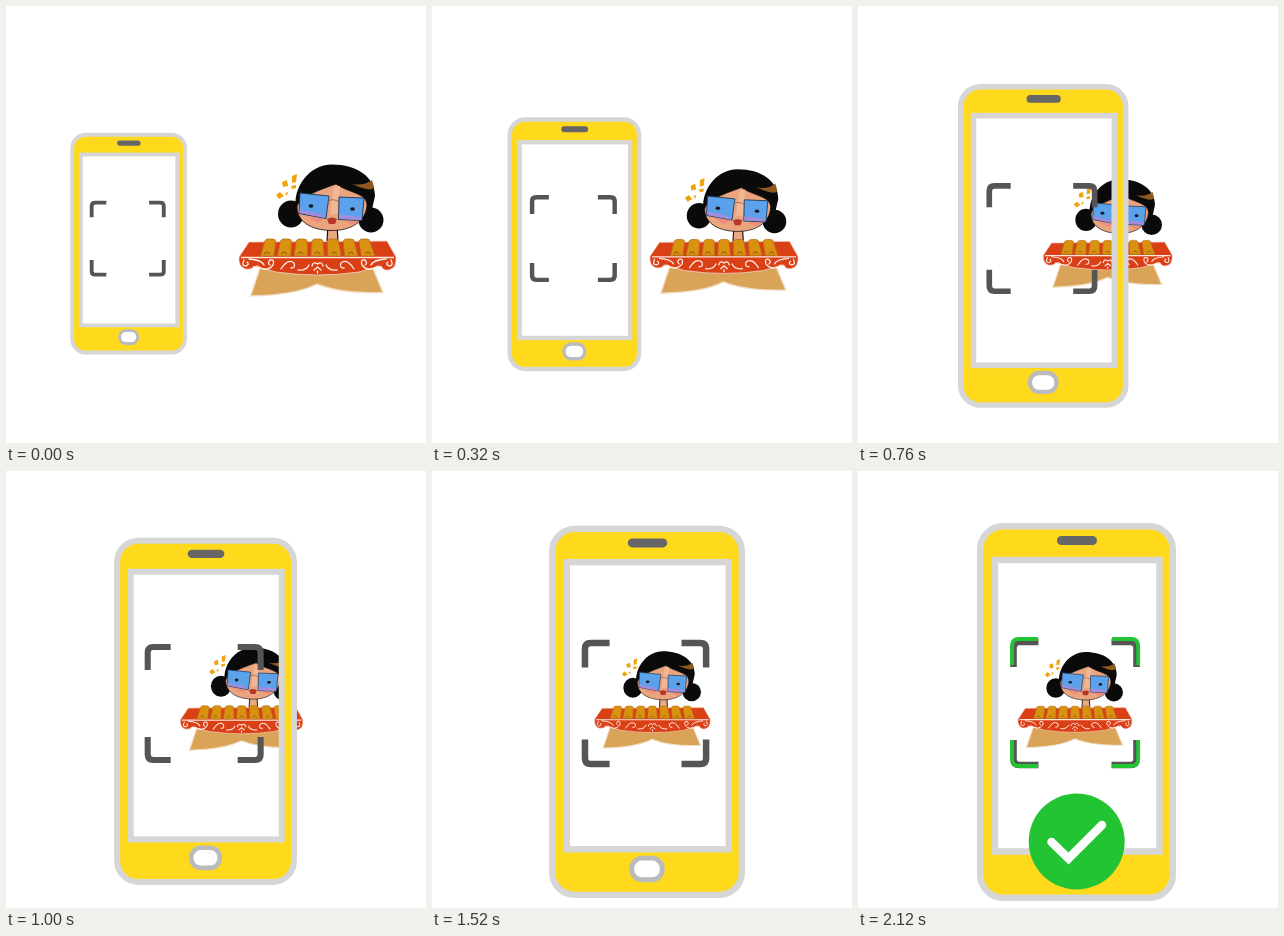
Write an HTML page that moves like this. It is 420x437 px and loops after 3.04 s.

```html
<!DOCTYPE html>
<html lang="en">
<head>
<meta charset="utf-8">
<title>Phone scan</title>
<style>
html, body { margin: 0; width: 100%; height: 100%; overflow: hidden; background: #fff; }
svg { display: block; width: 100vw; height: 100vh; }
</style>
</head>
<body>
<svg viewBox="0 0 420 437" fill="none">
  <g id="player">
    <path d="M254 262L244.500 290Q290 289 311 278Q335 288 377 286.500L366 260Z" fill="#d9a458" stroke="#f2dcc2" stroke-width="1.400"/>
    <path d="M322 218H331L332 236H321Z" fill="#e9a982" stroke="#111" stroke-width="1.200"/>
    <g fill="#0a0a0a">
      <ellipse cx="285" cy="208" rx="13" ry="13.500"/>
      <ellipse cx="365" cy="214" rx="12.500" ry="12.500"/>
      <path d="M290 204C286 182 303 158.500 326 158.500C351 158.500 369 171 369 190L364 212H291Z"/>
    </g>
    <path d="M291 202C291 193 307 186 330 178C343 187 361 187 361 199C360 216 344 225 325 224.500C305 224 292 216 291 202Z" fill="#eaa57e" stroke="#111" stroke-width=".8"/>
    <path d="M328 181L334 180L332 208L324 208Z" fill="#f2b795"/>
    <path d="M346 178Q358 180 366 174L368 181Q366 187 346 178Z" fill="#8e5920"/>
    <path d="M300 210L318 213L312 217ZM337 215H353L346 219Z" fill="#ef8c7d"/>
    <g fill="#5ba2ea" stroke="#1d3350" stroke-width=".9">
      <path d="M294 187L323 190L320 212.500L293 207.500Z"/>
      <path d="M333 191L358 192L356 214.500L332.500 213.500Z"/>
    </g>
    <path d="M293.500 203.500L315 208L319 212L293.500 207ZM333 208.500L355 211V214L333 213Z" fill="#a48bdc"/>
    <path d="M322 195Q327 192 333 196" stroke="#8d5a44" stroke-width=".8"/>
    <g fill="#171923"><ellipse cx="305" cy="200" rx="2.400" ry="1.800"/><ellipse cx="346.500" cy="203" rx="2.400" ry="1.800"/></g>
    <path d="M321 213Q326 210 331 213L329 218H323Z" fill="#b6382c"/>
    <g fill="#f0a30c">
      <path d="M276 176L281 174L282 180L277 181ZM286 170L291 168L290 176L286 177ZM270 189L274 186L278 190L273 193ZM285 180L290 179V182L286 183ZM279 187L282 186L281 190Z"/>
    </g>
    <path d="M243 236L381 235L390 251Q391 262 383 264Q377 265 375 260Q362 263 353 266Q312 272 270 266Q259 263 248 260Q246 264 239 263Q232 260 233 251Z" fill="#da3f16" stroke="#f6d5c8" stroke-width=".8"/>
    <path d="M235 251.500H388" stroke="#fbe6dc" stroke-width="1.500"/>
    <g id="bars"></g>
    <g id="swirls" stroke="#fff0e8" stroke-width="1.300" stroke-linecap="round">
      <path d="M306 260Q307 255 311.500 258Q316 255 317 260M308 264L311.500 261L315 264M311.500 265V267"/>
    </g>
  </g>
  <g id="phone">
    <path fill="#ffd91b" fill-rule="evenodd" d="M144 55H293Q315 55 315 77V405Q315 427 293 427H144Q122 427 122 405V77Q122 55 144 55ZM137 89V381H302V89Z"/>
    <g stroke="#d6d6d6" stroke-width="6.500">
      <rect x="122.200" y="55.200" width="192.600" height="371.600" rx="23"/>
      <rect x="137" y="89" width="164.500" height="291.500"/>
    </g>
    <rect x="199" y="65" width="40" height="9" rx="4.500" fill="#666"/>
    <rect x="203" y="389.500" width="31" height="22" rx="10.500" fill="#fff" stroke="#bbb" stroke-width="5"/>
    <path id="brackets" stroke="#555" stroke-width="6.600"/>
  </g>
  <g id="success">
    <path id="glow" stroke="#22c433" stroke-width="3.800"/>
    <circle cx="218.700" cy="370.500" r="48" fill="#22c433"/>
    <path d="M193.500 371L210.500 387.500L244 354" stroke="#fff" stroke-width="8.500" stroke-linecap="round"/>
  </g>
</svg>
<script>
const LOOP = 3040, STEP = 40, MOVE = 2000, FADE = 120;
const $ = id => document.getElementById(id);
const mix = (a, b, p) => a + (b - a) * p;

function corners(left, top, right, bottom, arm, r) {
  const corner = (x, y, sx, sy) =>
    `M${x + sx * arm} ${y}H${x + sx * r}Q${x} ${y} ${x} ${y + sy * r}V${y + sy * arm}`;
  return corner(left, top, 1, 1) + corner(right, top, -1, 1) +
    corner(left, bottom, 1, -1) + corner(right, bottom, -1, -1);
}

// cubic-bezier(.25, .1, .25, 1)
function ease(x) {
  if (x >= 1) return 1;
  let lo = 0, hi = 1;
  for (let i = 0; i < 30; i++) {
    const s = (lo + hi) / 2;
    if (0.75 * s * (1 - s) + s ** 3 < x) lo = s; else hi = s;
  }
  return 0.3 * lo * (1 - lo) ** 2 + 3 * lo * lo * (1 - lo) + lo ** 3;
}

// Moves and scales a group around its own centre.
function place(id, cx, cy, from, to, p) {
  const [x, y, s] = from.map((v, i) => mix(v, to[i], p));
  $(id).setAttribute("transform", `translate(${x} ${y}) scale(${s}) translate(${-cx} ${-cy})`);
}

function build() {
  $("brackets").setAttribute("d", corners(155.5, 171, 278.5, 294, 25, 6));
  $("glow").setAttribute("d", corners(154, 168, 280.2, 295, 26, 7));
  for (let i = 0; i < 7; i++) {
    const x = 254.5 + i * 16.8, lean = (3 - i) * 1.1;
    $("bars").innerHTML += `<path d="M${x} 250L${x + 1 + lean} 235Q${x + 2 + lean} 233 ${x + 4 + lean} 233H${x + 9 + lean}Q${x + 12 + lean} 233 ${x + 12 + lean} 236L${x + 13.5} 250Z"
      fill="#d8920f" stroke="#b8701a" stroke-width=".8"/><path d="M${x + 4} 248Q${x + 6.5} 244 ${x + 9} 248" stroke="#8f6018" stroke-width="1.2"/>`;
  }
  const scroll = "M18 260Q28 267 34 259Q36 253 31 254Q28 257 31 259M42 263Q49 252 55 257Q57 262 52 262" +
    "M5 254Q2 260 7 260Q11 258 8 256M10 253Q23 254 25 259M59 264Q67 265 70 259";
  for (const side of ["translate(233)", "translate(390) scale(-1 1)"])
    $("swirls").innerHTML += `<path d="${scroll}" transform="${side}"/>`;
}

function draw(time) {
  const t = Math.floor((time % LOOP) / STEP) * STEP;
  const p = ease(t / MOVE);
  place("phone", 218.5, 241, [122.6, 237.6, 0.586], [218.5, 241, 1], p);
  place("player", 311.5, 224.5, [311.5, 224.5, 1], [217, 229, 0.726], p);
  $("success").setAttribute("opacity", Math.min(1, Math.max(0, (t - MOVE) / FADE)));
}

build();
const start = performance.now();
function tick() {
  draw(performance.now() - start);
  requestAnimationFrame(tick);
}
tick();
</script>
</body>
</html>
```
